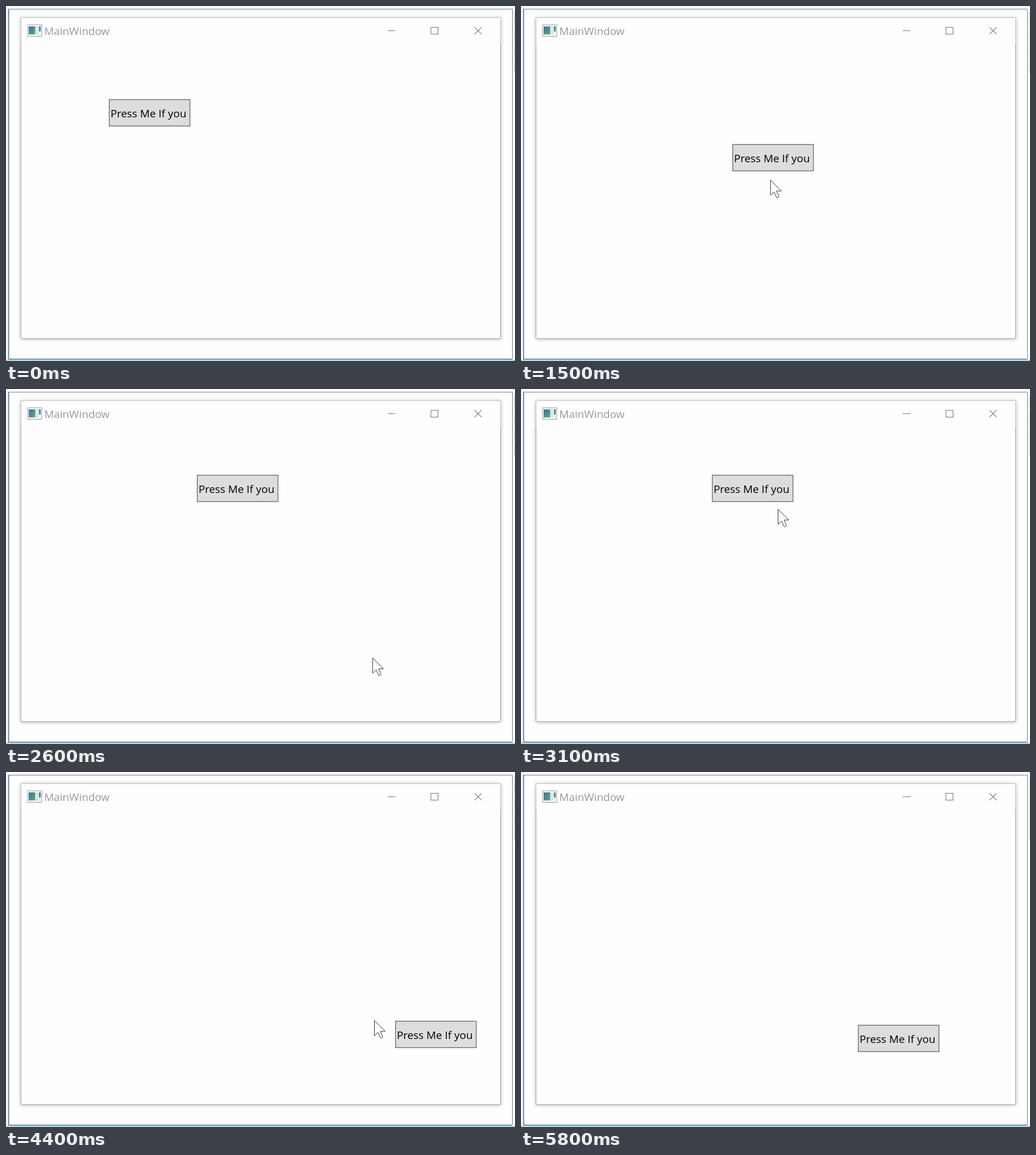
An HTML page for the animation above (6 s loop, 896 px wide and 625 px high).

```html
<!DOCTYPE html>
<html lang="en">
<head>
<meta charset="utf-8">
<title>Runaway button</title>
<style>
  html, body { margin: 0; width: 100%; height: 100%; overflow: hidden; background: #fff; }
  svg { display: block; width: 896px; height: 625px; }
  text { font-family: "Open Sans", "Noto Sans", sans-serif; }
  .window { filter: drop-shadow(0 1px 3px rgba(0, 0, 0, .3)); }
  .controls { fill: none; stroke: #777; stroke-width: 1.1; }
</style>
</head>
<body>
<svg viewBox="0 0 896 625">
  <defs>
    <linearGradient id="teal" x1="0" y1="0" x2="1" y2="1">
      <stop offset="0" stop-color="#3b729c"/>
      <stop offset="1" stop-color="#5bab80"/>
    </linearGradient>
  </defs>

  <!-- Surrounding frame -->
  <rect width="896" height="625" fill="#fefefe"/>
  <rect width="4" height="625" fill="#f3f5f6"/>
  <rect y="622.5" width="896" height="2.5" fill="#b4d3e2"/>
  <path d="M4 5.5H891.5V621" fill="none" stroke="#737d82"/>
  <path d="M4.6 5V621.6H891" fill="none" stroke="#2b6a88" stroke-width="1.4"/>
  <path d="M895.5 10V118" stroke="#c9cbc6" stroke-dasharray="25 3"/>

  <!-- Application window -->
  <rect class="window" x="26" y="20" width="845" height="565.5" fill="#fefefe"/>
  <path d="M26.5 67V20.5H870.5V67" fill="none" stroke="#c4c4c4"/>
  <path d="M26.5 67V585.4H870.5V67" fill="none" stroke="#a6a6a6"/>
  <rect x="38" y="33" width="25" height="20.5" fill="#f0f2f4" stroke="#9da4aa"/>
  <rect x="40" y="36" width="11.5" height="14" fill="url(#teal)"/>
  <rect x="52.5" y="36" width="4" height="14" fill="#dde2e6"/>
  <rect x="58" y="36" width="3.2" height="9" fill="url(#teal)"/>
  <text x="67.2" y="51.3" font-size="18.9" fill="#999">MainWindow</text>
  <path class="controls" d="M672 43.5H685.5M748 37.5H760.5V49.5H748ZM824.8 37.3L837.2 49.7M837.2 37.3L824.8 49.7"/>

  <g id="button">
    <rect x=".7" y=".7" width="142" height="46.6" fill="#ddd" stroke="#707070" stroke-width="1.4"/>
    <text x="2.9" y="32.4" font-size="18.85" fill="#000">Press Me If you</text>
  </g>
  <path id="cursor" d="M.5 .5V27.2L6.7 21.4L11.2 31.3Q13.6 32.3 15.3 29.7L11.1 19.7H19.5Z"
        fill="#fff" stroke="#2a2a2a" stroke-width=".95"/>
</svg>
<script>
const LOOP = 6000, TICK = 100;
const SIZE = { w: 143, h: 48 };

// Where the button flees to, in order
const spots = [
  [181, 164], [397, 432], [372, 243], [100, 432], [642, 438],
  [336, 151], [257, 190], [267, 478], [685, 438], [593, 445]
];
// Turning points of the pointer: time, x, y
const turns = [
  [300, 634, 152], [600, 320, 190], [1000, 477, 414], [1200, 480, 456],
  [1600, 425, 256], [2000, 238.5, 442], [2600, 645, 473], [3100, 452, 211],
  [3200, 474, 190], [3600, 260, 227], [4100, 360, 508], [4400, 648, 437],
  [4800, 886, 450]
];
const button = document.getElementById("button");
const cursor = document.getElementById("cursor");

function pointerAt(t) {
  const i = turns.findIndex(turn => turn[0] > t);
  if (i < 1) return null;
  const [t0, x0, y0] = turns[i - 1], [t1, x1, y1] = turns[i];
  const k = (t - t0) / (t1 - t0);
  return [x0 + (x1 - x0) * k, y0 + (y1 - y0) * k];
}

const touches = ([px, py], [x, y]) =>
  px >= x && px <= x + SIZE.w && py >= y && py <= y + SIZE.h;

// The button moves on whenever the pointer reaches it.
function buttonAt(t) {
  let i = 0;
  for (let tick = 0; tick <= t; tick += TICK) {
    const pointer = pointerAt(tick);
    if (pointer && touches(pointer, spots[i])) i++;
  }
  return spots[i];
}

const place = (node, [x, y]) => node.setAttribute("transform", `translate(${x} ${y})`);

function draw(time) {
  const t = Math.floor((time % LOOP) / TICK) * TICK;
  const pointer = pointerAt(t);
  place(button, buttonAt(t));
  cursor.style.display = pointer ? "" : "none";
  if (pointer) place(cursor, pointer);
}

const start = performance.now();
function frame() {
  draw(performance.now() - start);
  requestAnimationFrame(frame);
}
frame();
</script>
</body>
</html>
```
